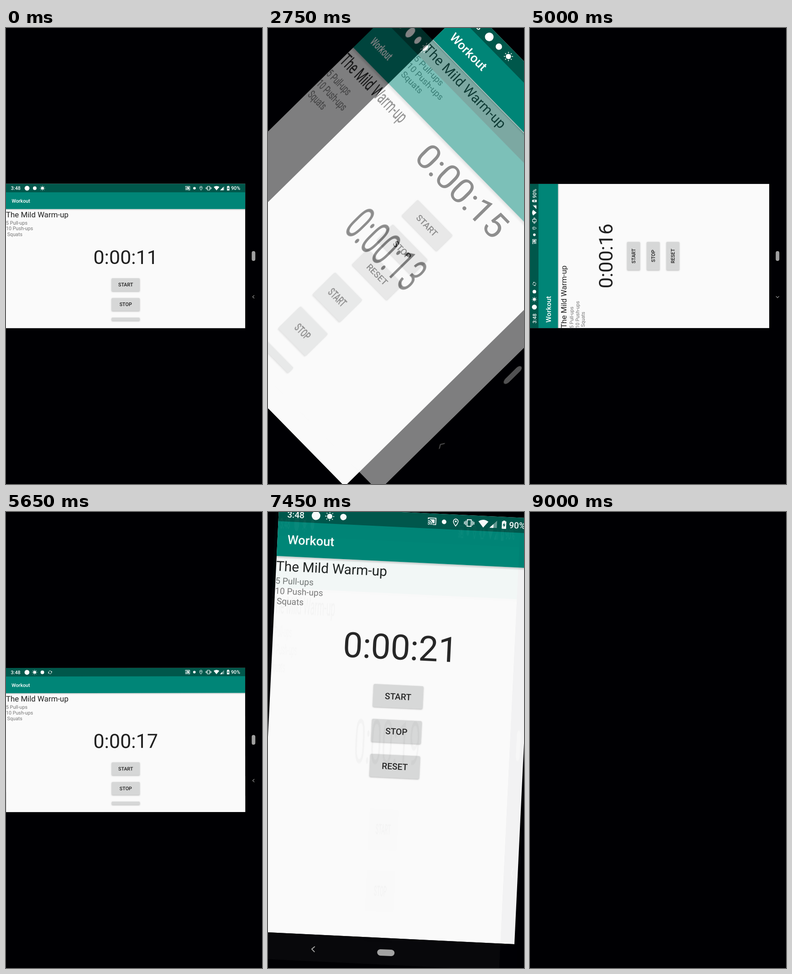
An HTML page with a canvas for the animation above (9100 ms loop, 561 px wide and 997 px high).

```html
<!DOCTYPE html>
<html lang="en">
<head>
<meta charset="utf-8">
<title>Workout timer</title>
<style>
  html, body { margin: 0; width: 100%; height: 100%; overflow: hidden; background: #000003; }
  canvas { display: block; width: 561px; height: 997px; }
</style>
</head>
<body>
<canvas id="stage"></canvas>
<script>
const SHORT = 561, LONG = 997, LOOP = 9100;
const FIT = SHORT / LONG;
const NAV = 65, TURN_MS = 400;
const INK = '#202020', GREY = '#757575', DARK = '#00574b', BLACK = '#000003';

// Each turn freezes a snapshot at `snap` and starts to rotate at `go`.
const turns = [
  { snap: 2150, go: 2700 },
  { snap: 4500, go: 5350 },
  { snap: 6850, go: 7250 }
];
const ticks = [
  [0, 11], [1150, 12], [2100, 13], [2150, 15], [3550, 16],
  [4500, 17], [5850, 18], [6800, 19], [6850, 21], [8100, 22]
];

const dpr = window.devicePixelRatio || 1;
const stage = document.getElementById('stage');
const ctx = stage.getContext('2d');
stage.width = SHORT * dpr;
stage.height = LONG * dpr;
const shot = document.createElement('canvas');
const shotCtx = shot.getContext('2d');

const lerp = (a, b, p) => a + (b - a) * p;

function text(c, str, x, y, size, color, weight = 400, align = 'left') {
  c.font = `${weight} ${size}px Roboto, sans-serif`;
  c.textAlign = align;
  c.fillStyle = color;
  c.fillText(str, x, y);
}

function box(c, x, y, w, h, r) {
  c.beginPath();
  c.roundRect(x, y, w, h, r);
  c.fill();
}

function path(c, points, closed) {
  c.beginPath();
  for (let i = 0; i < points.length; i += 2) c.lineTo(points[i], points[i + 1]);
  if (closed) c.closePath();
}

function dot(c, r) {
  c.beginPath();
  c.arc(0, 0, r, 0, Math.PI * 2);
  c.fill();
}

const icons = {
  disc: c => dot(c, 9.5),
  badge: c => dot(c, 7),
  radio: c => dot(c, 5),
  sun(c) {
    dot(c, 5.8);
    for (let i = 0; i < 8; i++) {
      c.save();
      c.rotate(i * Math.PI / 4);
      c.fillRect(-0.8, -10, 1.6, 2.6);
      c.restore();
    }
  },
  sync(c) {
    c.lineWidth = 1.6;
    for (let i = 0; i < 2; i++) {
      c.save();
      c.rotate(i * Math.PI);
      c.beginPath();
      c.arc(0, 0, 6, -0.5, 2);
      c.stroke();
      path(c, [2, -4, 8, -4, 6.5, 0.5], true);
      c.fill();
      c.restore();
    }
  },
  cast(c) {
    c.lineWidth = 1.8;
    path(c, [-8.4, -4, -8.4, -7, 8.4, -7, 8.4, 7, 2, 7]);
    c.stroke();
    path(c, [-5.5, -4.2, 5.6, -4.2, 5.6, 4.3, 1.5, 4.3, -1.5, -1.5, -5.5, -3.4], true);
    c.fill();
    for (const r of [2, 5.4, 9]) {
      c.beginPath();
      c.arc(-9, 7.8, r, -Math.PI / 2, 0);
      c.stroke();
    }
  },
  pin(c) {
    c.lineWidth = 1.7;
    c.beginPath();
    c.arc(0, -2.2, 5.2, Math.PI * 0.92, Math.PI * 0.08);
    c.quadraticCurveTo(4, 3.5, 0, 8);
    c.quadraticCurveTo(-4, 3.5, -5.2, -0.9);
    c.closePath();
    c.stroke();
    c.translate(0, -2.2);
    dot(c, 2);
  },
  vibrate(c) {
    c.lineWidth = 1.8;
    c.strokeRect(-4.4, -7.2, 8.8, 14.4);
    for (const s of [-1, 1]) {
      c.fillRect(s * 7.4 - 0.9, -5, 1.8, 10);
      c.fillRect(s * 10.4 - 0.9, -3, 1.8, 6);
    }
  },
  wifi(c) {
    c.beginPath();
    c.moveTo(0, 8.5);
    c.lineTo(-11, -4.8);
    c.quadraticCurveTo(0, -12.4, 11, -4.8);
    c.closePath();
    c.fill();
  },
  signal(c, level) {
    const x = lerp(-8, 8, level);
    c.globalAlpha *= 0.4;
    path(c, [-8, 8, 8, 8, 8, -8], true);
    c.fill();
    c.globalAlpha /= 0.4;
    path(c, [-8, 8, x, 8, x, -x], true);
    c.fill();
  },
  battery(c) {
    c.fillRect(-2.2, -9, 4.4, 3);
    box(c, -4.8, -7.4, 9.6, 16.4, 1);
    c.fillStyle = DARK;
    path(c, [0.8, -5, -3, 1.8, -0.4, 1.8, -0.8, 6.4, 3, -0.6, 0.4, -0.6], true);
    c.fill();
  }
};

function icon(c, name, x, arg) {
  c.save();
  c.translate(x, 17);
  c.fillStyle = c.strokeStyle = '#fff';
  icons[name](c, arg);
  c.restore();
}

function statusBar(c, w, s) {
  c.fillStyle = DARK;
  c.fillRect(0, 0, w, 33);
  text(c, '3:48', 19, 24, 19.1, '#fff', 500);
  s.alerts.forEach((name, i) => icon(c, name, 82 + i * 30));
  const x = w - SHORT;
  icon(c, 'cast', x + 336.5);
  icon(c, 'radio', x + 363);
  icon(c, 'pin', x + 388.5);
  icon(c, 'vibrate', x + 418);
  icon(c, 'wifi', x + 449);
  icon(c, 'signal', x + 471, s.level);
  icon(c, 'battery', x + 494.5);
  text(c, '90%', x + 505.5, 24, 19.1, '#fff', 500);
}

function button(c, cx, y, h, label) {
  c.save();
  c.shadowColor = 'rgba(0,0,0,0.28)';
  c.shadowBlur = 3 * dpr;
  c.shadowOffsetY = dpr;
  c.fillStyle = '#d6d7d7';
  box(c, cx - 54.5, y, 109, h, 2.7);
  c.restore();
  if (label) text(c, label, cx, y + 31.9, 19.1, INK, 500, 'center');
}

function navBar(c, land, w, h) {
  c.fillStyle = BLACK;
  if (land) c.fillRect(w, 0, NAV, h);
  else c.fillRect(0, h, w, NAV);
  const mid = SHORT / 2;
  c.fillStyle = '#a0a0a0';
  if (land) box(c, 957, mid - 19, 14, 38, 7);
  else box(c, mid - 19, 957, 38, 14, 7);
  const [x, y] = land ? [964, 439] : [121.5, 964];
  c.strokeStyle = '#a0a0a0';
  c.lineWidth = 2;
  path(c, [x + 3, y - 6, x - 3.5, y, x + 3, y + 6]);
  c.stroke();
}

// Draws the phone screen in its own coordinates.
function screen(c, s) {
  const land = s.land;
  const w = land ? LONG - NAV : SHORT;
  const h = land ? SHORT : LONG - NAV;
  const bar = land ? 98 : 109;
  const mid = w / 2;

  c.fillStyle = '#fafafa';
  c.fillRect(0, 0, w, h);
  const shade = c.createLinearGradient(0, bar, 0, bar + 6);
  shade.addColorStop(0, 'rgba(0,0,0,0.2)');
  shade.addColorStop(1, 'rgba(0,0,0,0)');
  c.fillStyle = shade;
  c.fillRect(0, bar, w, 6);
  c.fillStyle = '#008577';
  c.fillRect(0, 32, w, bar - 32);
  statusBar(c, w, s);
  if (land) text(c, 'Workout', 22, 73.5, 19.1, '#fff', 500);
  else text(c, 'Workout', 22, 81.7, 27.3, '#fff', 500);

  text(c, 'The Mild Warm-up', 0, bar + 32.3, 30, INK);
  ['5 Pull-ups', '10 Push-ups', ' Squats'].forEach((line, i) =>
    text(c, line, 0, bar + 60.6 + i * 22.2, 19.1, GREY));
  text(c, `0:00:${s.sec}`, mid, bar + 213.3, 76.4, INK, 400, 'center');

  button(c, mid, bar + 269.3, 50, 'START');
  button(c, mid, bar + 345.8, 50, 'STOP');
  if (land) button(c, mid, 520, 12);
  else button(c, mid, 531.3, 50, 'RESET');
  navBar(c, land, w, h);
}

function stateAt(t) {
  let alerts = ['disc', 'badge', 'sun'];
  if (t >= 3800) alerts = ['disc', 'sun', 'badge'];
  if (t >= 3800 && t < 5850) alerts.push('sync');
  return {
    land: turns.filter(turn => t >= turn.snap).length % 2 === 0,
    sec: ticks.filter(tick => t >= tick[0]).pop()[1],
    level: t >= 4500 && t < 7900 ? 0.53 : 0.8,
    alerts
  };
}

const sizeOf = land => land ? [LONG, SHORT] : [SHORT, LONG];

// Runs `draw` with the origin at the corner of a centred, turned w x h sheet.
function placed(angle, sx, sy, [w, h], draw) {
  ctx.save();
  ctx.translate(SHORT / 2, LONG / 2);
  ctx.rotate(angle);
  ctx.scale(sx, sy);
  ctx.translate(-w / 2, -h / 2);
  draw();
  ctx.restore();
}

function drawTurn(turn, t, now, k) {
  const old = stateAt(turn.snap - 1);
  const size = sizeOf(now.land), oldSize = sizeOf(old.land);
  const u = Math.max(0, (t - turn.go) / TURN_MS);
  const rest = Math.pow(1 - u, 5);
  const angle = (now.land ? -1 : 1) * rest * Math.PI / 2;

  ctx.save();
  ctx.beginPath();
  ctx.rect(0, (LONG - size[1] * k) / 2, SHORT, size[1] * k);
  ctx.clip();
  if (u === 0) {
    placed(angle, k, k, oldSize, () => screen(ctx, old));
  } else {
    placed(angle, k, k, size, () => screen(ctx, now));
    [shot.width, shot.height] = oldSize;
    screen(shotCtx, old);
    ctx.globalAlpha = rest;
    placed(angle,
      k * lerp(size[0] / oldSize[0], 1, rest),
      k * lerp(size[1] / oldSize[1], 1, rest),
      oldSize, () => ctx.drawImage(shot, 0, 0));
  }
  ctx.restore();
}

// Screen-off fade: brightness from 1 to 0.
function brightness(t) {
  const u = Math.min(1, Math.max(0, (t - 8530) / 450));
  if (u === 0) return 1;
  const p = (1 - Math.cos(u * Math.PI)) / 2;
  const cos = Math.cos(p * Math.PI);
  const gamma = (0.5 * Math.sign(cos) * cos * cos + 0.5) * 0.9 + 0.1;
  return Math.pow(Math.max(0, 1 - p * p), 1 / gamma);
}

function render(t) {
  const now = stateAt(t);
  const k = now.land ? FIT : 1;
  const turn = turns.find(r => t >= r.snap && t < r.go + TURN_MS);
  ctx.setTransform(dpr, 0, 0, dpr, 0, 0);
  ctx.fillStyle = BLACK;
  ctx.fillRect(0, 0, SHORT, LONG);
  if (turn) drawTurn(turn, t, now, k);
  else placed(0, k, k, sizeOf(now.land), () => screen(ctx, now));
  ctx.globalAlpha = 1 - brightness(t);
  ctx.fillStyle = BLACK;
  ctx.fillRect(0, 0, SHORT, LONG);
  ctx.globalAlpha = 1;
}

const start = performance.now();
function loop() {
  render((performance.now() - start) % LOOP);
  requestAnimationFrame(loop);
}
loop();
</script>
</body>
</html>
```
